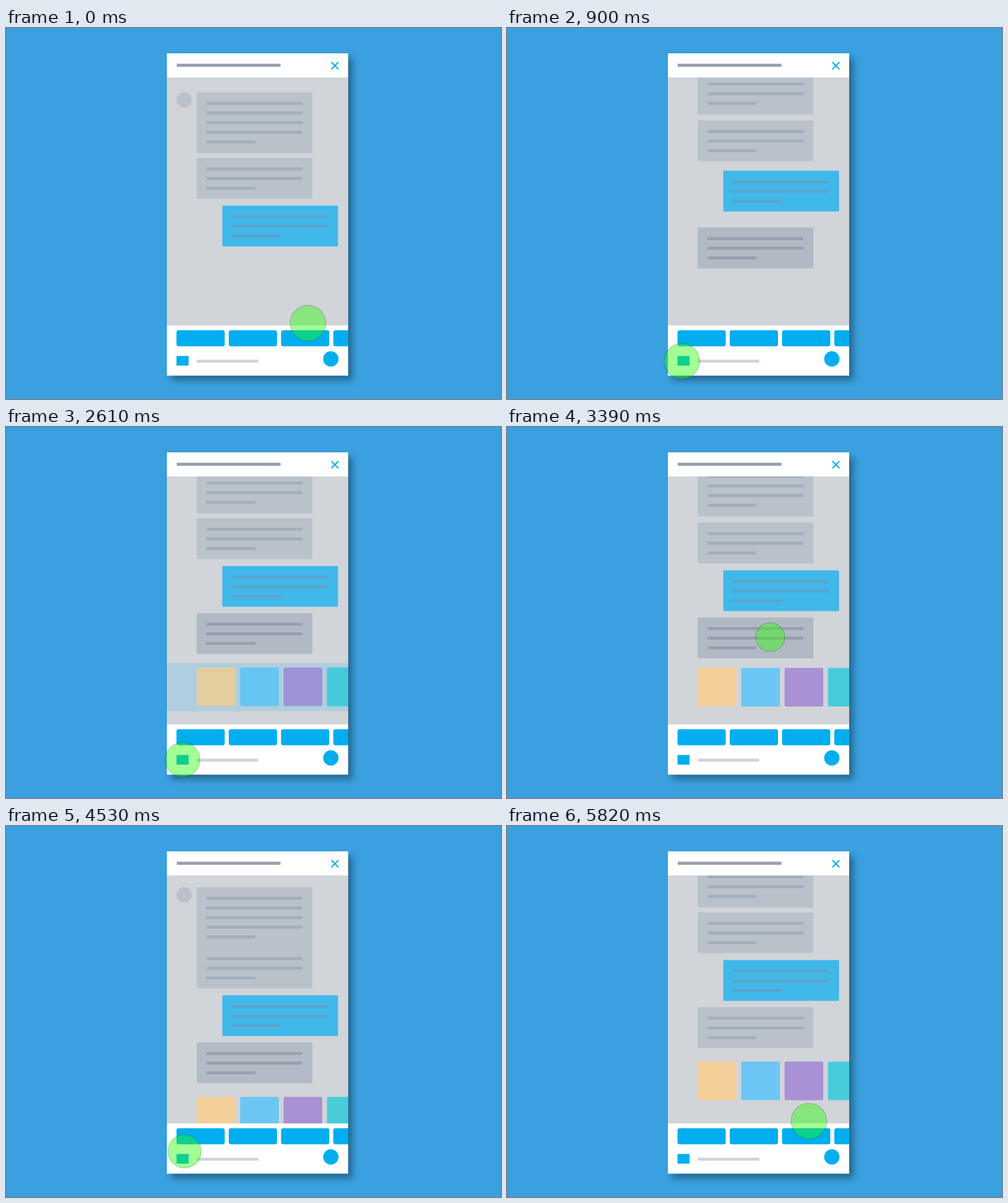
These frames come from a looping animation (800 by 600 pixels, 6.3 s). An HTML page with a canvas:

```html
<!DOCTYPE html>
<html lang="en">
<head>
<meta charset="utf-8">
<title>Chat interaction</title>
<style>
html, body { margin: 0; width: 100%; height: 100%; overflow: hidden; background: #3aa0df; }
canvas { display: block; }
</style>
</head>
<body>
<canvas id="stage" width="800" height="600"></canvas>
<script>
const ctx = document.getElementById('stage').getContext('2d');
const LOOP = 6300, STEP = 30;
const BLUE = '#00aef0', PANEL = '#d1d4d9';
const OLD_BOX = [185, 194, 203], OLD_LINE = [164, 173, 186];
const NEW_BOX = [177, 185, 196], NEW_LINE = [151, 159, 173];
const TILES = ['#f3cf99', '#6cc6f3', '#a891d4', '#48ccda'];

// Smooth progress from 0 to 1 between two times
const ease = (t, from, to) => {
  const u = Math.min(1, Math.max(0, (t - from) / (to - from)));
  return u * u * (3 - 2 * u);
};
const mix = (a, b, u) => a + (b - a) * u;
const mixColor = (a, b, u) => `rgb(${a.map((v, i) => Math.round(mix(v, b[i], u)))})`;
const bezier = (a, b, c, d, u) => {
  const v = 1 - u;
  return v * v * v * a + 3 * v * v * u * b + 3 * v * u * u * c + u * u * u * d;
};

function box(x, y, w, h, color, radius = 0) {
  ctx.fillStyle = color;
  ctx.beginPath();
  ctx.roundRect(x, y, w, h, radius);
  ctx.fill();
}

function disc(x, y, r, color) {
  ctx.fillStyle = color;
  ctx.beginPath();
  ctx.arc(x, y, r, 0, 7);
  ctx.fill();
}

function message(x, y, lines, fill, lineColor) {
  box(x, y, 187, 66 + (lines - 3) * 16.1, fill, 1.5);
  for (let i = 0; i < lines; i++)
    box(x + 15.8, y + 15.5 + i * 15.6, i < lines - 1 ? 155 : 79, 4.8, lineColor);
}

function drawChat(t) {
  const pull = 74 * ease(t, 3276, 3876) - 82 * ease(t, 4310, 4910);
  const firstY = 104 - 62.5 * ease(t, 300, 900)
    + 74 * ease(t, 3297, 3897) - 82 * ease(t, 4357, 4957);
  const secondY = 210 - 62.5 * ease(t, 362, 962) + pull;
  const replyY = 287.3 - 62.5 * ease(t, 414, 1014) + pull;
  const newY = 481 - 180 * ease(t, 430, 1030) + pull;
  const tilesY = 639 - 250 * ease(t, 620, 1260)
    + 74 * ease(t, 3360, 3960) - 82 * ease(t, 4310, 4910);
  const aging = ease(t, 4350, 4950);
  const glow = 0.16 * (ease(t, 1800, 2200) - ease(t, 2650, 3100));
  const oldBox = `rgb(${OLD_BOX})`, oldLine = `rgb(${OLD_LINE})`;

  ctx.save();
  ctx.beginPath();
  ctx.rect(260, 80, 293, 401);
  ctx.clip();
  disc(288, firstY + 12.2, 12.3, oldBox);
  message(308.2, firstY, 5, oldBox, oldLine);
  message(308.2, secondY, 3, oldBox, oldLine);
  message(349.6, replyY, 3, '#40b8ea', '#5ca3cd');
  message(308.2, newY, 3, mixColor(NEW_BOX, OLD_BOX, aging), mixColor(NEW_LINE, OLD_LINE, aging));
  box(260, 382, 293, 77.5, `rgba(0,174,240,${glow})`);
  TILES.forEach((color, i) => {
    const x = 308.2 + i * 70.2;
    box(x, tilesY, 62.5, 62.5, color, 3);
    box(x, tilesY, 62.5, 62.5, `rgba(0,174,240,${glow * 0.4})`, 3);
  });
  ctx.restore();
}

function drawCard(t) {
  ctx.save();
  ctx.shadowColor = 'rgba(0,0,0,.35)';
  ctx.shadowBlur = 10;
  ctx.shadowOffsetX = 7;
  ctx.shadowOffsetY = 8;
  box(260, 41, 293, 521.3, '#fff');
  ctx.restore();
  box(260, 80, 293, 401, PANEL);
  drawChat(t);

  box(276, 57.8, 167.7, 5, '#97a0ae');
  ctx.strokeStyle = BLUE;
  ctx.lineWidth = 2;
  ctx.beginPath();
  for (const s of [-1, 1]) {
    ctx.moveTo(531.5 - 5.7, 61 - 5.7 * s);
    ctx.lineTo(531.5 + 5.7, 61 + 5.7 * s);
  }
  ctx.stroke();

  for (let i = 0; i < 3; i++) box(275.5 + i * 84.5, 488.8, 78, 26, BLUE, 3.5);
  box(529, 488.8, 24, 26, BLUE, [3.5, 0, 0, 3.5]);
  box(275.5, 530.4, 19.6, 15.6, BLUE);
  box(308.3, 536.5, 99.4, 4.8, '#cfd3d8');
  disc(525, 535.2, 12.4, BLUE);
}

function touchPoint(t) {
  if (t < 640) {
    const u = ease(t, 0, 640);
    return [mix(488, 285.5, u), mix(477.3, 538, u)];
  }
  if (t < 2640) {
    const drift = Math.sin(Math.PI * (t - 640) / 2000) ** 1.6;
    return [285.5 - 12 * drift, 538 + 3.6 * drift];
  }
  if (t < 4090) {
    const u = ease(t, 2600, 3270);
    return [mix(285.5, 425.5, u), mix(538, 333, u) + 74 * ease(t, 3276, 3876)];
  }
  if (t < 4850) {
    const u = ease(t, 4090, 4560);
    return [mix(425.5, 287, u), mix(407, 527.5, u)];
  }
  const u = ease(t, 4850, 5820);
  return [bezier(287, 390, 545, 488, u), bezier(527.5, 528, 510, 477.3, u)];
}

function drawTouch(t) {
  const [x, y] = touchPoint(t);
  const r = 28.8 - 5.4 * (ease(t, 2400, 3250) - ease(t, 4200, 4750));
  disc(x, y, r, 'rgba(34,255,0,.415)');
  ctx.strokeStyle = 'rgba(0,0,0,.16)';
  ctx.lineWidth = 1.5;
  ctx.stroke();
}

function frame() {
  const t = Math.floor(performance.now() % LOOP / STEP) * STEP;
  ctx.fillStyle = '#3aa0df';
  ctx.fillRect(0, 0, 800, 600);
  drawCard(t);
  drawTouch(t);
  requestAnimationFrame(frame);
}
frame();
</script>
</body>
</html>
```
